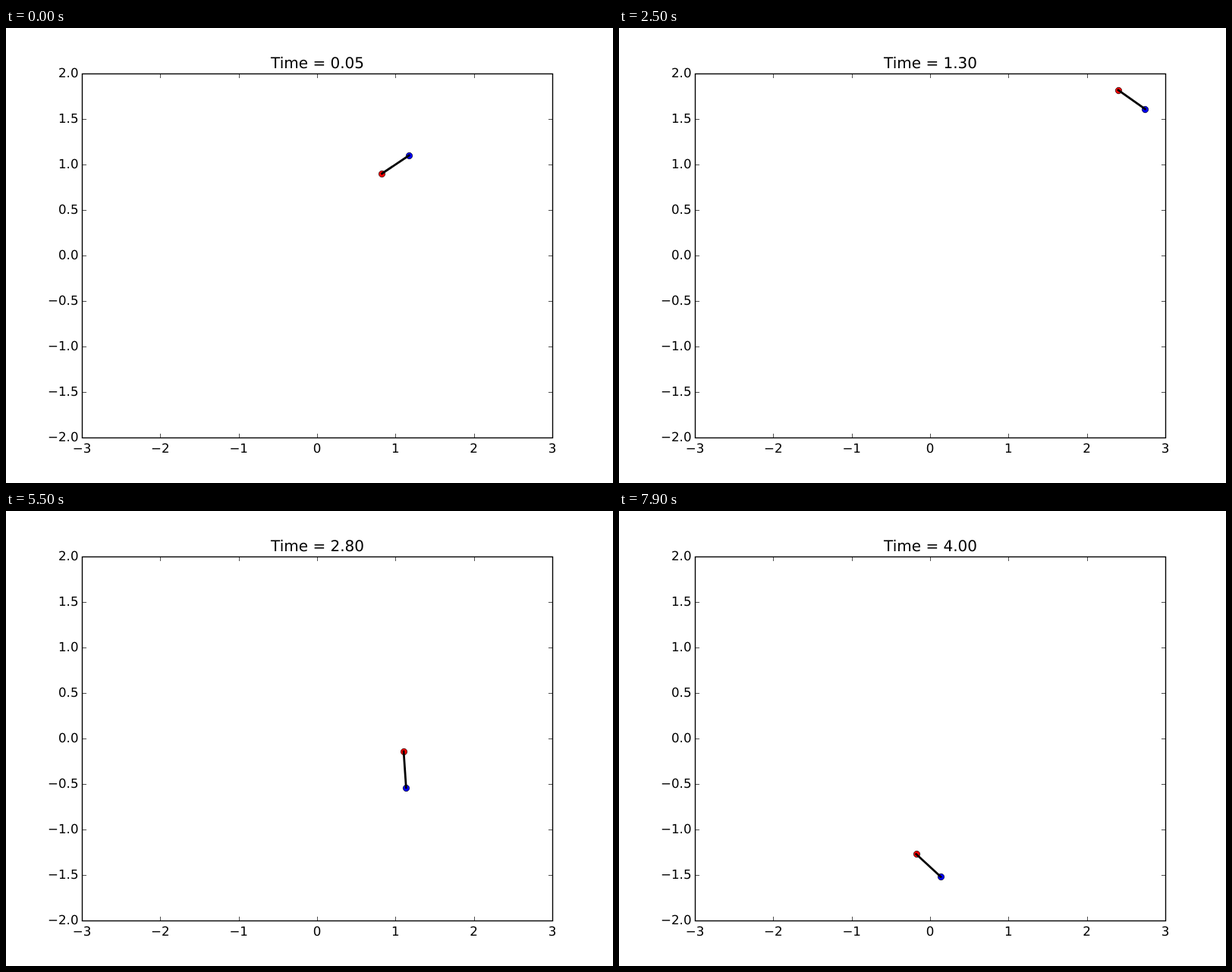
Write an HTML page that moves like this. It is 800 px wide and 600 px high and loops after 8 s.

```html
<!DOCTYPE html>
<html lang="en">
<head>
<meta charset="utf-8">
<title>Bouncing dumbbell</title>
<style>
  html, body { margin: 0; width: 100%; height: 100%; overflow: hidden; background: #fff; }
  svg { display: block; width: 800px; height: 600px; }
  text { font-family: "DejaVu Sans", sans-serif; font-size: 16.667px; text-rendering: geometricPrecision; }
  #title { font-size: 20px; }
</style>
</head>
<body>
<svg viewBox="0 0 800 600">
  <clipPath id="box"><rect x="100" y="60" width="620" height="480"/></clipPath>
  <g clip-path="url(#box)" stroke="#000">
    <circle id="blue" r="4.167" fill="#00f" stroke-width="0.694"/>
    <circle id="red" r="4.167" fill="#f00" stroke-width="0.694"/>
    <line id="rod" stroke-width="2.778" stroke-linecap="square"/>
  </g>
  <rect x="100.5" y="60.5" width="620" height="480" fill="none" stroke="#000" stroke-width="1.389"/>
  <path id="ticks" fill="none" stroke="#000" stroke-width="0.694"/>
  <g id="labels"></g>
  <text id="title" x="410.6" y="53" text-anchor="middle"></text>
</svg>
<script>
const FRAME_MS = 100, FRAMES = 80, DT = 0.05;
const WALL_X = 3, WALL_Y = 2, ARM = 0.2;

const $ = id => document.getElementById(id);
const px = x => 410 + x * 310 / 3;
const py = y => 300 - y * 120;
const snap = v => Math.floor(v + 0.5) + 0.5;
const setAttrs = (el, attrs) => {
  for (const key in attrs) el.setAttribute(key, attrs[key]);
};

function drawAxes() {
  let path = "";
  const label = (x, y, anchor, text) => {
    const el = document.createElementNS("http://www.w3.org/2000/svg", "text");
    setAttrs(el, { x, y, "text-anchor": anchor });
    el.textContent = text.replace("-", "\u2212");
    $("labels").append(el);
  };
  for (let x = -WALL_X; x <= WALL_X; x++) {
    const p = snap(px(x));
    path += `M${p} 540.5v-5.556M${p} 60.5v5.556`;
    label(px(x), 560, "middle", String(x));
  }
  for (let y = -WALL_Y; y <= WALL_Y; y += 0.5) {
    const p = snap(py(y));
    path += `M100.5 ${p}h5.556M720.5 ${p}h-5.556`;
    label(95.5, py(y) + 5, "end", y.toFixed(1));
  }
  $("ticks").setAttribute("d", path);
}

// The rod is rigid, with an equal point mass at each end.
const advance = (s, t) => ({ ...s, x: s.x + s.vx * t, y: s.y + s.vy * t, angle: s.angle + s.spin * t });

const ends = s => [-ARM, ARM].map(r => {
  const dx = r * Math.cos(s.angle), dy = r * Math.sin(s.angle);
  return { dx, dy, x: s.x + dx, y: s.y + dy };
});

const outside = s => ends(s).findIndex(e => Math.abs(e.x) > WALL_X || Math.abs(e.y) > WALL_Y);

// Elastic impulse on the touching end, along the wall normal.
function bounce(s, index, hitsSide) {
  const { dx, dy } = ends(s)[index];
  const lever = hitsSide ? -dy : dx;
  const axis = hitsSide ? "vx" : "vy";
  const inertia = ARM * ARM;
  const impulse = -2 * (s[axis] + s.spin * lever) / (1 + lever * lever / inertia);
  return { ...s, [axis]: s[axis] + impulse, spin: s.spin + impulse * lever / inertia };
}

// A step ends early when an end reaches a wall.
function step(s) {
  const next = advance(s, DT);
  if (outside(next) < 0) return next;
  let lo = 0, hi = DT;
  for (let i = 0; i < 50; i++) {
    const mid = (lo + hi) / 2;
    if (outside(advance(s, mid)) < 0) lo = mid; else hi = mid;
  }
  const past = advance(s, hi), index = outside(past);
  return bounce(advance(s, lo), index, Math.abs(ends(past)[index].x) > WALL_X);
}

const start = { x: 1, y: 1, vx: 2.1, vy: 0.6, angle: Math.PI / 6, spin: 2 };
const states = [start, start];   // motion begins one frame late
while (states.length < FRAMES) states.push(step(states[states.length - 1]));

function render(ms) {
  const n = Math.floor(ms / FRAME_MS) % FRAMES;
  const [red, blue] = ends(states[n]);
  setAttrs($("red"), { cx: snap(px(red.x)), cy: snap(py(red.y)) });
  setAttrs($("blue"), { cx: snap(px(blue.x)), cy: snap(py(blue.y)) });
  setAttrs($("rod"), { x1: px(red.x), y1: py(red.y), x2: px(blue.x), y2: py(blue.y) });
  $("title").textContent = "Time = " + ((n + 1) * DT).toFixed(2);
}

drawAxes();
render(0);
let origin;
function tick(now) {
  origin ??= now;
  render(now - origin);
  requestAnimationFrame(tick);
}
requestAnimationFrame(tick);
</script>
</body>
</html>
```
